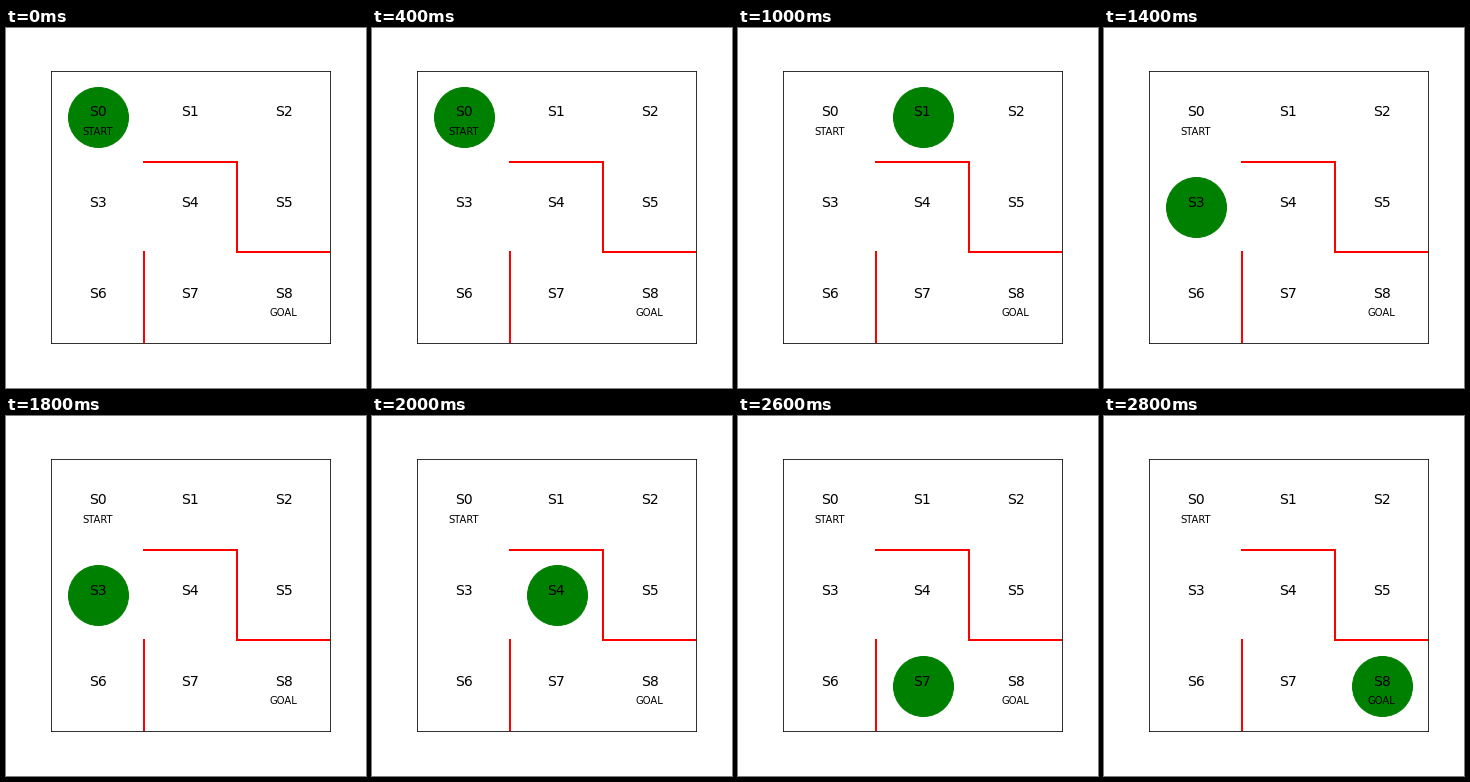
Animation of 360 by 360 pixels, one loop 3 s. Source, as a matplotlib script:

```python
import matplotlib.pyplot as plt
from matplotlib.animation import FuncAnimation

STEP_MS = 200
PATH = [0, 1, 0, 3, 0, 1, 0, 3, 0, 3, 4, 3, 4, 7, 8]
WALLS = [((1, 1), (0, 1)), ((1, 2), (2, 2)), ((2, 2), (2, 1)), ((2, 3), (1, 1))]


def cell_center(state):
    return state % 3 + 0.5, 2.5 - state // 3


plt.rcParams["font.family"] = "DejaVu Sans"
fig = plt.figure(figsize=(5, 5), dpi=72, facecolor="white")
fig.subplots_adjust(left=0.125, right=0.9, bottom=0.125, top=0.88)
ax = fig.add_subplot()
ax.set(xlim=(0, 3), ylim=(0, 3), xticks=[], yticks=[])

for xs, ys in WALLS:
    ax.plot(xs, ys, color="red", linewidth=2)

for state in range(9):
    ax.text(*cell_center(state), f"S{state}", size=14, ha="center")
ax.text(0.5, 2.3, "START", size=10, ha="center")
ax.text(2.5, 0.3, "GOAL", size=10, ha="center")

agent, = ax.plot([0.5], [2.5], marker="o", color="g", markersize=60)


def update(i):
    x, y = cell_center(PATH[i])
    agent.set_data([x], [y])
    return agent,


anim = FuncAnimation(fig, update, frames=len(PATH), interval=STEP_MS,
                     init_func=lambda: update(0), repeat=True, repeat_delay=0)
plt.show()
```
